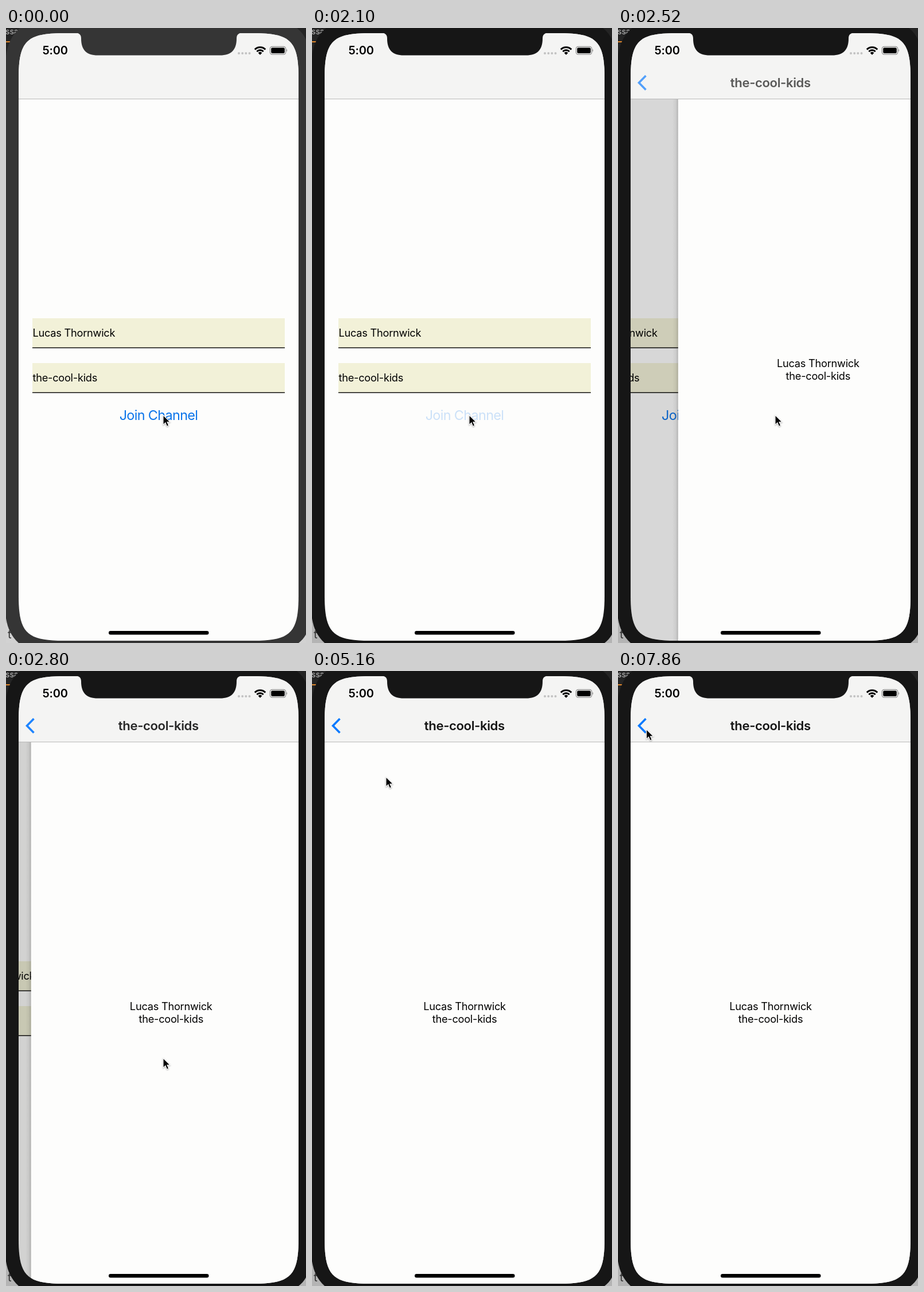
Recreate the animation shown at these times as an HTML page. Size 523 by 1070 pixels, loop 8000 ms.

```html
<!DOCTYPE html>
<html lang="en">
<head>
<meta charset="utf-8">
<title>Join a channel</title>
<style>
  html, body { margin: 0; width: 100%; height: 100%; overflow: hidden; background: #222; }
  svg { display: block; width: 100vw; height: 100vh; }
  text { font-family: Inter, "Liberation Sans", sans-serif; }
  .body { font-size: 18.2px; letter-spacing: -.25px; }
  .button { font-size: 23.4px; letter-spacing: -.65px; fill: #0a74ea; }
  .title { font-size: 22.1px; font-weight: 600; letter-spacing: -.38px; fill: #141414; }
  .clock { font-size: 20px; font-weight: 600; letter-spacing: -.2px; }
  .mid { text-anchor: middle; }
  .bezel { fill: #353535; }
  .desk { fill: #d2d2d2; }
  .active .bezel { fill: #161616; }
  .active .desk { fill: #b4b4b4; }
  .field { fill: #f2f1d8; }
  #cursor { filter: drop-shadow(0 1px 1px rgba(0, 0, 0, .35)); }
</style>
</head>
<body>
<svg id="stage" viewBox="0 0 523 1070" preserveAspectRatio="none">
  <defs>
    <clipPath id="screen">
      <path d="M22 87C22 23 36 9 100 9H432C496 9 510 23 510 87V988C510 1052 496 1066 432 1066H100C36 1066 22 1052 22 988Z"/>
    </clipPath>
    <linearGradient id="edge">
      <stop offset="0" stop-opacity="0"/>
      <stop offset=".6" stop-opacity=".05"/>
      <stop offset="1" stop-opacity=".17"/>
    </linearGradient>
  </defs>

  <!-- desktop behind the phone -->
  <rect width="523" height="535" fill="#242424"/>
  <text x="-1" y="11" font-size="14" fill="#bdbdbd">ssa</text>
  <rect y="23" width="12" height="2" fill="#e0872c"/>
  <rect class="desk" y="535" width="523" height="535"/>
  <text x="3" y="1062" font-size="20" fill="#333">t</text>

  <path class="bezel" d="M0 48C3 30 9 12 25 0H507C514 6 519 12 523 20V1055C519 1062 515 1066 510 1070H22C9 1058 3 1045 0 1027Z"/>

  <g clip-path="url(#screen)">
    <rect width="523" height="1070" fill="#fdfdfc"/>
    <g id="form">
      <rect class="field" x="46" y="505" width="440" height="51"/>
      <rect x="46" y="555.7" width="440" height="1.4"/>
      <text class="body" x="46.5" y="537">Lucas Thornwick</text>
      <rect class="field" x="46" y="583" width="440" height="51"/>
      <rect x="46" y="633.7" width="440" height="1.4"/>
      <text class="body" x="46.5" y="615">the-cool-kids</text>
      <text class="button mid" id="join" x="266" y="682">Join Channel</text>
    </g>
    <rect id="dim" width="523" height="1070"/>
    <g id="chat">
      <rect x="12" y="123" width="10" height="947" fill="url(#edge)"/>
      <rect x="22" y="123" width="489" height="947" fill="#fdfdfc"/>
      <text class="body mid" x="266" y="590">Lucas Thornwick</text>
      <text class="body mid" x="266" y="612.3">the-cool-kids</text>
    </g>
    <rect width="523" height="123.2" fill="#f4f4f3"/>
    <rect y="123" width="523" height="1" fill="#b9b9b9"/>
    <g id="head">
      <path d="M48.5 83L36.5 95.2L48.5 107.5" fill="none" stroke="#0a7aff" stroke-width="3.6"/>
      <text class="title mid" x="265.8" y="103">the-cool-kids</text>
    </g>

    <text class="clock" x="63.5" y="46.3">5:00</text>
    <g fill="#c2c2c2">
      <circle cx="406" cy="44" r="2"/><circle cx="412.2" cy="44" r="2"/>
      <circle cx="418.3" cy="44" r="2"/><circle cx="424.5" cy="44" r="2"/>
    </g>
    <g fill="none" stroke="#000" stroke-width="3">
      <path d="M433.8 37.4A13 13 0 0 1 452.2 37.4"/>
      <path d="M437.3 41A8 8 0 0 1 448.7 41"/>
    </g>
    <path d="M439.6 43.2A5 5 0 0 1 446.4 43.2L443 46.8Z"/>
    <rect x="460.3" y="32.4" width="27.4" height="13.4" rx="3.6" fill="none" stroke="#8b8b8b" stroke-width="1.2"/>
    <rect x="462.2" y="34.2" width="23.6" height="9.8" rx="2"/>
    <path d="M489 36.6Q491.4 39.1 489 41.6Z" fill="#8b8b8b"/>
    <rect x="179" y="1049" width="174.5" height="6.5" rx="3.25"/>
  </g>

  <path class="bezel" d="M122 8.5C128 9 131 12 131 18C131 38 140 47.5 160 47.5H373C393 47.5 402 38 402 18C402 12 405 9 411 8.5Z"/>

  <path id="cursor" d="M0 0V16.8L3.9 13.2L6.6 19.4L9.6 18.1L7 12H12.2Z" stroke="#fff" stroke-width="1.1"/>
</svg>
<script>
  const LOOP = 8000, ACTIVATE = 1900, PRESS = 1950, PUSH = 2150;
  const WIDTH = 488;
  // time, x, y of the pointer tip
  const POINTER = [
    [4300, 274, 673.5], [4600, 225, 480], [4920, 143, 215], [5160, 129, 184.5],
    [5700, 110, 160], [6400, 53, 105], [6700, 49.5, 101.5]
  ];
  const $ = id => document.getElementById(id);
  const stage = $('stage'), form = $('form'), chat = $('chat'), head = $('head'),
        join = $('join'), dim = $('dim'), cursor = $('cursor');

  const clamp = v => Math.max(0, Math.min(1, v));
  const inOut = u => u < .5 ? 2 * u * u : 1 - 2 * (1 - u) ** 2;
  const move = (el, x, y = 0) => el.setAttribute('transform', `translate(${x} ${y})`);

  function pointerAt(t) {
    const next = POINTER.findIndex(k => k[0] > t);
    if (next === 0) return POINTER[0].slice(1);
    if (next < 0) return POINTER.at(-1).slice(1);
    const a = POINTER[next - 1], b = POINTER[next];
    const u = (t - a[0]) / (b[0] - a[0]);
    return [1, 2].map(i => a[i] + (b[i] - a[i]) * u);
  }

  // the picture rests for 100 ms at the end of each 840 ms stretch
  function withRests(t) {
    if (t < 1660 || t >= 6700) return t;
    return t - Math.max(0, (t - 1660) % 840 - 740);
  }

  function draw(now) {
    const t = withRests(now % LOOP);
    // overdamped spring
    const p = t < PUSH ? 0 : 1 - Math.exp(-.00478 * (t - PUSH));
    stage.classList.toggle('active', t >= ACTIVATE);
    move(form, -.3 * WIDTH * p);
    move(chat, p ? WIDTH * (1 - p) : WIDTH + 20);
    dim.setAttribute('opacity', .18 * p);
    head.setAttribute('opacity', p * p);
    const fade = t < PUSH
      ? 1 - .8 * inOut(clamp((t - PRESS) / 150))
      : .2 + .8 * inOut(clamp((t - PUSH) / 250));
    join.setAttribute('opacity', fade);
    move(cursor, ...pointerAt(t));
  }

  const start = performance.now();
  function tick() {
    draw(performance.now() - start);
    requestAnimationFrame(tick);
  }
  tick();
</script>
</body>
</html>
```
